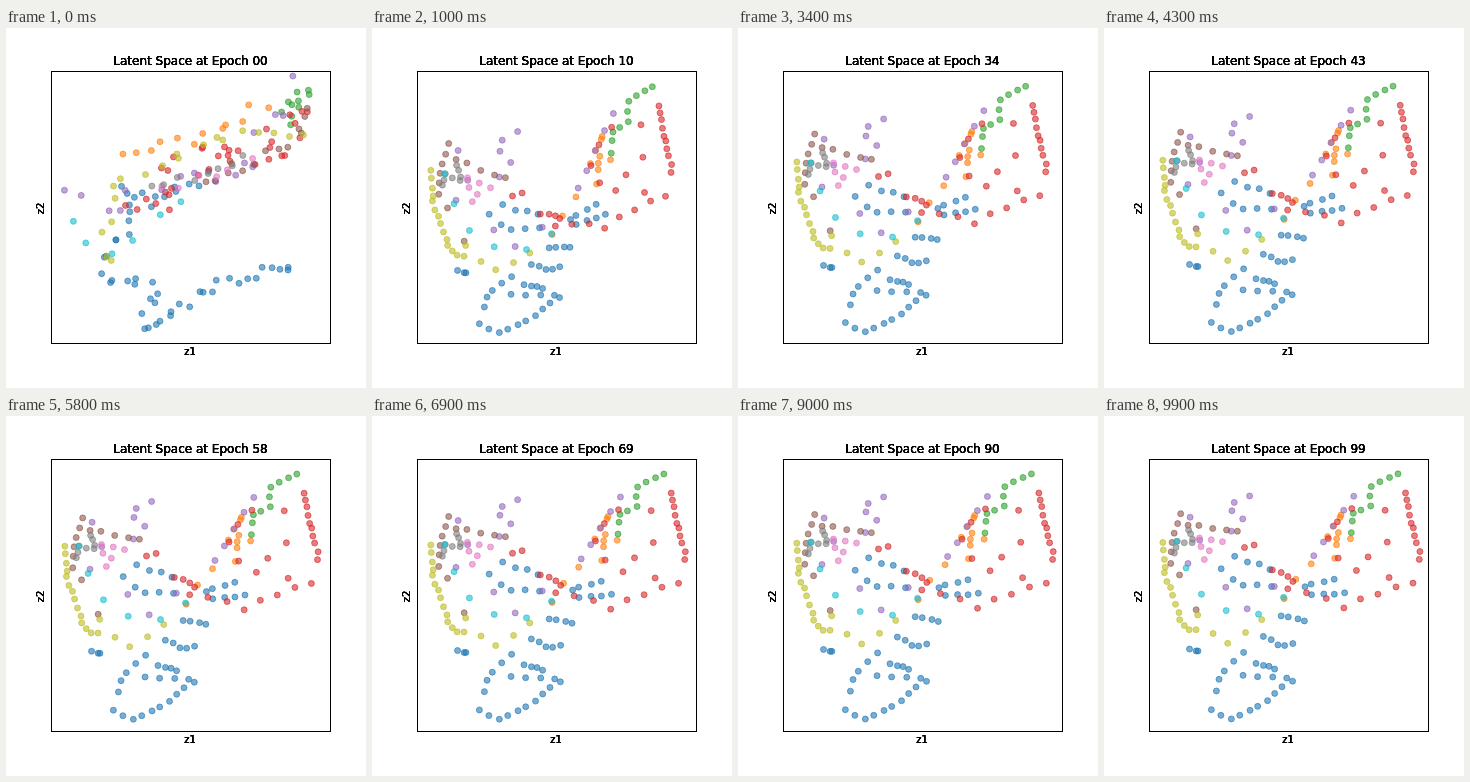
Animation, 360 px wide and 360 px high, one loop 10 s. Source, as an HTML page with a canvas:

```html
<!DOCTYPE html>
<html lang="en">
<head>
<meta charset="utf-8">
<title>Latent space</title>
<style>
html, body { margin: 0; width: 100%; height: 100%; overflow: hidden; background: #fff; }
canvas { display: block; }
</style>
</head>
<body>
<canvas id="stage" width="360" height="360"></canvas>
<script>
const ctx = document.getElementById('stage').getContext('2d');
const EPOCHS = 100, EPOCH_MS = 100, SETTLED = 10, REFERENCE = 58;
const dots = [];

let seed = 7;
function jitter(size) {
  seed = (seed * 16807) % 2147483647;
  return (seed / 2147483647 * 2 - 1) * size;
}

// Point at fraction u of the length of a polyline
function along(path, u) {
  const lengths = path.slice(1).map(([x, y], i) => Math.hypot(x - path[i][0], y - path[i][1]));
  let rest = u * lengths.reduce((a, b) => a + b), i = 0;
  while (i < lengths.length - 1 && rest > lengths[i]) rest -= lengths[i++];
  return path[i].map((v, axis) => v + (path[i + 1][axis] - v) * rest / lengths[i]);
}

// A class begins loosely along one path and settles evenly along its strands.
function cluster(color, spread, startPath, ...strands) {
  const total = strands.reduce((sum, [count]) => sum + count, 0);
  let index = 0;
  for (const [count, ...path] of strands) {
    for (let i = 0; i < count; i++) {
      const start = along(startPath, index++ / (total - 1)).map(v => v + jitter(spread));
      const home = along(path, i / (count - 1)).map(v => v + jitter(1.5));
      dots.push({ color, start, home });
    }
  }
}

cluster('#1f77b4', 6,
  [[288, 237], [212, 254], [137, 303], [148, 257], [110, 256], [98, 238], [120, 200], [118, 160], [145, 175], [197, 149]],
  [10, [108, 295], [127, 303], [157, 290], [187, 266]],
  [4, [184, 264], [139, 262]],
  [4, [171, 255], [152, 249]],
  [5, [139, 240], [119, 258], [112, 277]],
  [3, [95, 236], [87, 236]],
  [5, [159, 225], [178, 232], [190, 229]],
  [4, [177, 204], [201, 207]],
  [5, [116, 162], [137, 176], [168, 177]],
  [4, [130, 149], [166, 161]],
  [8, [239, 180], [204, 183], [200, 174], [228, 166]]);

cluster('#ff7f0e', 6,
  [[260, 75], [206, 104], [118, 131]],
  [9, [246, 126], [222, 128], [237, 96], [230, 145]],
  [3, [205, 154], [181, 187]]);

cluster('#2ca02c', 8,
  [[298, 58], [278, 92]],
  [10, [291, 57], [262, 72], [263, 91], [246, 98], [245, 118]]);

cluster('#d62728', 14,
  [[295, 85], [260, 130], [225, 130], [185, 130], [155, 170], [130, 190]],
  [10, [297, 77], [303, 101], [311, 134], [312, 143]],
  [3, [278, 94], [280, 127], [283, 162]],
  [7, [305, 167], [251, 185], [237, 193], [203, 180]],
  [2, [263, 143], [249, 157]],
  [4, [246, 94], [222, 120], [232, 145]],
  [5, [168, 160], [190, 168], [185, 180]],
  [2, [151, 137], [142, 139]]);

cluster('#9467bd', 12,
  [[278, 59], [250, 138], [190, 148], [104, 178], [58, 165]],
  [5, [247, 82], [225, 117], [208, 145]],
  [3, [171, 176], [139, 201], [121, 177]],
  [5, [145, 86], [121, 95], [140, 112], [127, 122]],
  [3, [87, 106], [97, 127], [84, 154]]);

cluster('#8c564b', 8,
  [[298, 76], [295, 110], [262, 132], [198, 150]],
  [5, [134, 124], [83, 114]],
  [6, [77, 103], [70, 123], [66, 151]],
  [2, [75, 165], [91, 198]]);

cluster('#e377c2', 6,
  [[241, 133], [225, 145], [153, 158]],
  [6, [117, 135], [98, 126], [92, 134], [108, 145], [100, 150]]);

cluster('#7f7f7f', 5,
  [[235, 132], [150, 160]],
  [8, [84, 118], [90, 134], [72, 130], [70, 142]]);

cluster('#bcbd22', 7,
  [[300, 110], [245, 98], [150, 138], [112, 152], [100, 210], [103, 238]],
  [5, [159, 209], [138, 223], [116, 232], [95, 204]],
  [14, [60, 131], [60, 157], [68, 185], [81, 216], [93, 218]]);

cluster('#17becf', 5,
  [[64, 195], [95, 227], [129, 213], [171, 172]],
  [6, [71, 130], [89, 177], [116, 201], [154, 203], [179, 186]]);

// The middle slowly rises and the right side widens, ever more slowly.
function settledAt([x, y], epoch) {
  const lag = Math.log(REFERENCE / Math.max(epoch, SETTLED));
  const middle = Math.exp(-(((x - 140) / 90) ** 2) - ((y - 145) / 90) ** 2);
  const right = Math.max(0, x - 180) / 130;
  return [x - 7 * lag * right, y + 16 * lag * middle];
}

function drawDot({ color, start, home }, epoch) {
  const ease = 1 - (1 - Math.min(epoch / SETTLED, 1)) ** 2;
  const [x, y] = settledAt(home, epoch).map((v, axis) => start[axis] + (v - start[axis]) * ease);
  ctx.fillStyle = ctx.strokeStyle = color;
  ctx.beginPath();
  ctx.arc(x, y, 3, 0, 2 * Math.PI);
  ctx.fill();
  ctx.stroke();
}

// Repeated passes give the heavy edges of the lettering.
function label(text, x, y, size, angle = 0) {
  ctx.save();
  ctx.translate(x, y);
  ctx.rotate(angle);
  ctx.font = `${size}px "DejaVu Sans", sans-serif`;
  ctx.textAlign = 'center';
  ctx.fillStyle = '#000';
  for (let i = 0; i < 5; i++) ctx.fillText(text, 0, 0);
  ctx.restore();
}

function draw(epoch) {
  ctx.fillStyle = '#fff';
  ctx.fillRect(0, 0, 360, 360);

  ctx.globalAlpha = 0.6;
  for (const dot of dots) drawDot(dot, epoch);

  ctx.globalAlpha = 1;
  ctx.strokeStyle = '#000';
  ctx.strokeRect(45.5, 43.5, 279, 272);
  label(`Latent Space at Epoch ${String(epoch).padStart(2, '0')}`, 184.5, 37, 12);
  label('z1', 184, 327, 10);
  label('z2', 38, 180.5, 10, -Math.PI / 2);
}

const begin = performance.now();
function tick() {
  draw(Math.floor((performance.now() - begin) / EPOCH_MS) % EPOCHS);
  requestAnimationFrame(tick);
}
tick();
</script>
</body>
</html>
```
